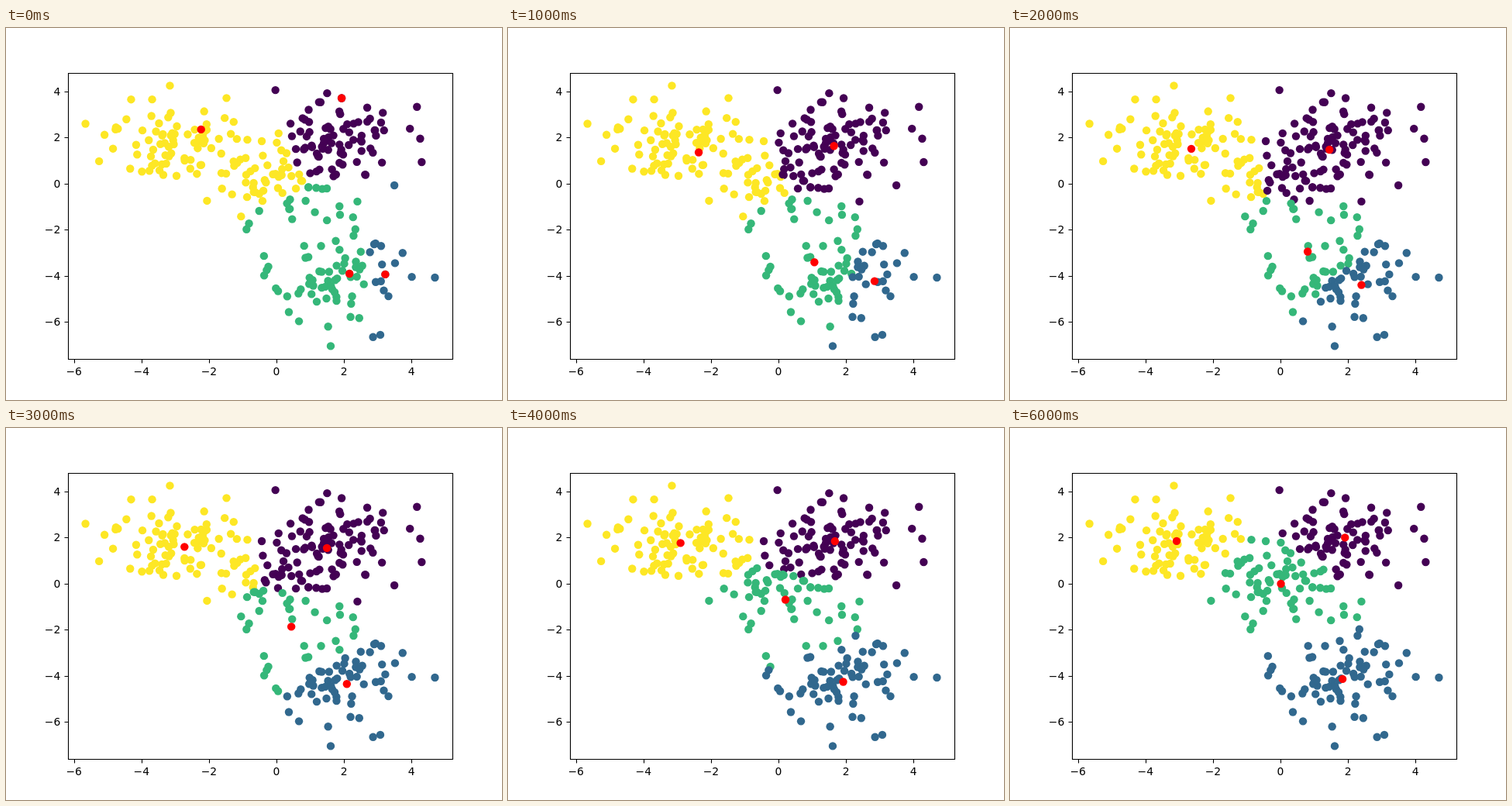
An HTML page for the animation above (6.5 s loop, 640 by 480 pixels).

```html
<!DOCTYPE html>
<html lang="en">
<head>
<meta charset="utf-8">
<title>K-means clustering</title>
<style>
  html, body { margin: 0; width: 100%; height: 100%; overflow: hidden; background: #fff; }
  svg { display: block; }
  text { font: 13.89px "DejaVu Sans", sans-serif; }
  .axes { fill: none; stroke: #000; stroke-width: 1.11; }
</style>
</head>
<body>
<svg id="plot" width="640" height="480" viewBox="0 0 640 480"></svg>
<script>
const STEP_MS = 500, STEPS = 13, RADIUS = 5.2;
const COLORS = ['#440154', '#31688e', '#35b779', '#fde725'];

// Mersenne Twister (MT19937), seeded with one integer
function twister(seed) {
  const N = 624, s = new Uint32Array(N);
  let pos = N;
  s[0] = seed;
  for (let i = 1; i < N; i++) s[i] = Math.imul(1812433253, s[i - 1] ^ (s[i - 1] >>> 30)) + i;
  return () => {
    if (pos === N) {
      for (let i = 0; i < N; i++) {
        const y = (s[i] & 0x80000000) | (s[(i + 1) % N] & 0x7fffffff);
        s[i] = s[(i + 397) % N] ^ (y >>> 1) ^ (y & 1 ? 0x9908b0df : 0);
      }
      pos = 0;
    }
    let y = s[pos++];
    y ^= y >>> 11;
    y ^= (y << 7) & 0x9d2c5680;
    y ^= (y << 15) & 0xefc60000;
    return (y ^ (y >>> 18)) >>> 0;
  };
}

const next = twister(0);
const uniform = () => ((next() >>> 5) * 67108864 + (next() >>> 6)) / 9007199254740992;

// Polar method: a pair of independent normal deviates
function normalPair() {
  let a, b, r;
  do {
    a = 2 * uniform() - 1;
    b = 2 * uniform() - 1;
    r = a * a + b * b;
  } while (r >= 1 || r === 0);
  const f = Math.sqrt(-2 * Math.log(r) / r);
  return [f * b, f * a];
}

function randomUpTo(max) {
  const mask = 2 ** (32 - Math.clz32(max)) - 1;
  let v;
  do v = next() & mask; while (v > max);
  return v;
}

const points = [];
for (const [cx, cy] of [[0, 0], [2, 2], [-3, 2], [2, -4]]) {
  for (let i = 0; i < 75; i++) {
    const [dx, dy] = normalPair();
    points.push([cx + dx, cy + dy]);
  }
}
for (let i = points.length - 1; i > 0; i--) {
  const j = randomUpTo(i);
  [points[i], points[j]] = [points[j], points[i]];
}

// Index of the entry in list closest to p
function nearest(p, list) {
  const d = list.map(q => (p[0] - q[0]) ** 2 + (p[1] - q[1]) ** 2);
  return d.indexOf(Math.min(...d));
}

const mean = (list, k) => list.reduce((sum, p) => sum + p[k], 0) / list.length;

// Lloyd's algorithm, starting from four of the points
let centers = [[1.94, 3.7], [3.23, -3.95], [2.17, -3.92], [-2.21, 2.33]]
  .map(p => points[nearest(p, points)]);
let labels = points.map(p => nearest(p, centers));
const steps = [{ centers, labels }];
while (steps.length < STEPS) {
  labels = points.map(p => nearest(p, centers));
  centers = centers.map((_, c) => {
    const members = points.filter((_, i) => labels[i] === c);
    return [mean(members, 0), mean(members, 1)];
  });
  steps.push({ centers, labels });
}

// Axes box with a 5% data margin on every side
function scale(k, from, to) {
  const values = points.map(p => p[k]);
  const min = Math.min(...values), max = Math.max(...values), pad = (max - min) * 0.05;
  return v => from + (v - min + pad) / (max - min + 2 * pad) * (to - from);
}
const X = scale(0, 80, 576), Y = scale(1, 427.2, 57.6);

const dot = ([x, y], fill) =>
  `<circle cx="${X(x).toFixed(2)}" cy="${Y(y).toFixed(2)}" r="${RADIUS}" fill="${fill}"/>`;

let ticks = '', text = '';
for (let v = -6; v <= 4; v += 2) {
  const label = String(v).replace('-', '\u2212');
  const x = Math.round(X(v)) + 0.5, y = Math.round(Y(v)) + 0.5;
  ticks += `M${x} 427.5v5M80.5 ${y}h-5`;
  text += `<text x="${X(v)}" y="447.5" text-anchor="middle">${label}</text>` +
    `<text x="70.3" y="${Math.round(Y(v) + 5)}" text-anchor="end">${label}</text>`;
}

const plot = document.getElementById('plot');
plot.innerHTML = `<g id="dots"></g><path class="axes" d="M80.5 58.5h496v369h-496z${ticks}"/>${text}`;
const dots = document.getElementById('dots');

let shown = -1;
function draw() {
  const step = Math.floor(performance.now() / STEP_MS) % STEPS;
  if (step !== shown) {
    const { centers, labels } = steps[step];
    dots.innerHTML = points.map((p, i) => dot(p, COLORS[labels[i]])).join('') +
      centers.map(c => dot(c, '#f00')).join('');
    shown = step;
  }
  requestAnimationFrame(draw);
}
draw();
</script>
</body>
</html>
```
